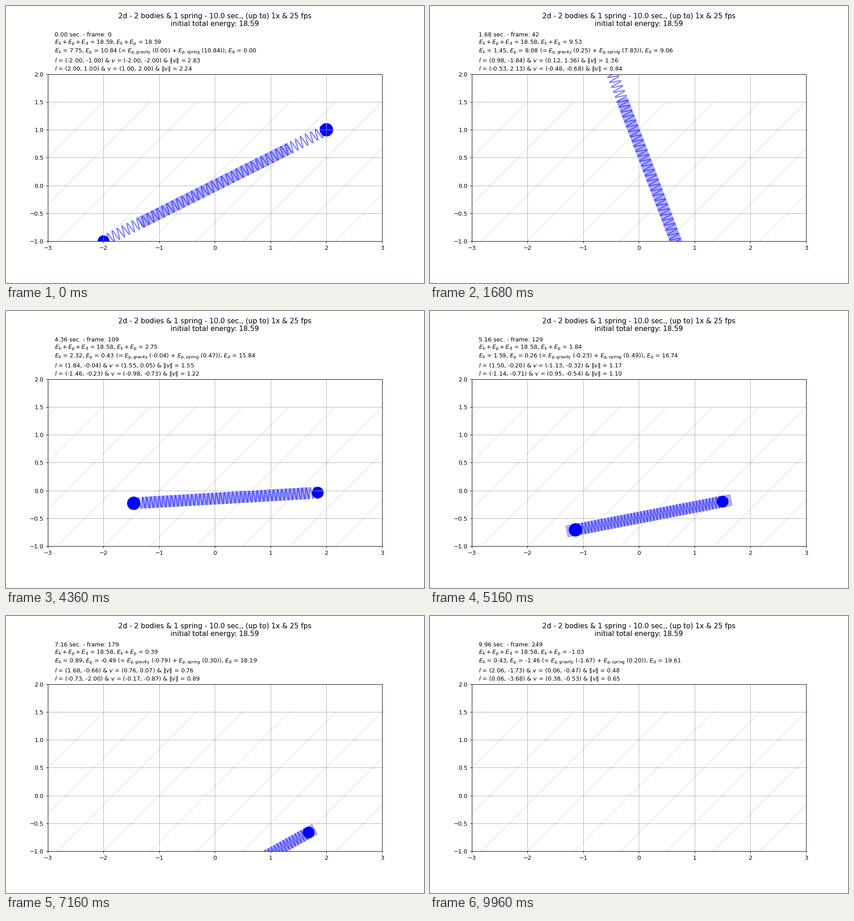
Recreate the animation shown at these times as a matplotlib script. Size 919x609 px, loop 10000 ms.

```python
import numpy as np
import matplotlib.pyplot as plt
from matplotlib.animation import FuncAnimation
from matplotlib.patches import Circle, Polygon

W, H, DPI = 919, 609, 92
FPS, SECONDS, SUBSTEPS = 25, 10, 50
DT = 1 / FPS / SUBSTEPS

# Points and vectors in the plane are complex numbers.
MASS = (1.0, 1.5)
GRAVITY = 0.1 - 0.2j
STIFFNESS, REST = 10.0, 3.0
DRAG, SURFACE = 0.5, 1.5
COILS, RADIUS = 45, 0.1


def drag(pos):
    """Drag acts only below the surface of the medium."""
    return DRAG if pos.imag < SURFACE else 0.0


def slope(state):
    p, q, v, w = state
    d = q - p
    pull = STIFFNESS * (1 - REST / abs(d)) * d
    a = GRAVITY + (pull - drag(p) * v) / MASS[0]
    b = GRAVITY + (-pull - drag(q) * w) / MASS[1]
    return v, w, a, b


def shift(state, rate, h):
    return tuple(s + h * r for s, r in zip(state, rate))


def rk4(state, h):
    k1 = slope(state)
    k2 = slope(shift(state, k1, h / 2))
    k3 = slope(shift(state, k2, h / 2))
    k4 = slope(shift(state, k3, h))
    return tuple(s + h / 6 * (a + 2 * b + 2 * c + d)
                 for s, a, b, c, d in zip(state, k1, k2, k3, k4))


def simulate():
    state, lost = (-2 - 1j, 2 + 1j, -2 - 2j, 1 + 2j), 0.0
    history = []
    for _ in range(FPS * SECONDS):
        history.append((state, lost))
        for _ in range(SUBSTEPS):
            state = rk4(state, DT)
            p, q, v, w = state
            lost += DT * (drag(p) * abs(v) ** 2 + drag(q) * abs(w) ** 2)
    return history


def energies(state):
    p, q, v, w = state
    kinetic = (MASS[0] * abs(v) ** 2 + MASS[1] * abs(w) ** 2) / 2
    height = sum(m * (GRAVITY.conjugate() * r).real for m, r in zip(MASS, (p, q)))
    spring = STIFFNESS * (abs(q - p) - REST) ** 2 / 2
    return kinetic, 0 - height, spring


def pair(z):
    return f"({z.real:.2f}, {z.imag:.2f})"


def sub(name):
    return rf"$E_\mathrm{{{name}}}$"


def body_line(pos, vel):
    return rf"$l$ = {pair(pos)} & $v$ = {pair(vel)} & $\|v\|$ = {abs(vel):.2f}"


def report(i, state, lost):
    p, q, v, w = state
    kin, grav, spring = energies(state)
    pot = grav + spring
    ek_ep = r"E_\mathrm{k} + E_\mathrm{p}"
    return "\n".join([
        f"{i / FPS:.2f} sec. - frame: {i}",
        rf"${ek_ep} + E_\mathrm{{d}}$ = {kin + pot + lost:.2f}, "
        rf"${ek_ep}$ = {kin + pot:.2f}",
        f"{sub('k')} = {kin:.2f}, {sub('p')} = {pot:.2f} "
        f"(= {sub('p,gravity')} ({grav:.2f}) + {sub('p,spring')} ({spring:.2f})), "
        f"{sub('d')} = {lost:.2f}",
        body_line(p, v),
        body_line(q, w),
    ])


def xy(z):
    return np.column_stack([np.real(z), np.imag(z)])


history = simulate()
total = sum(energies(history[0][0]))

# The small margin keeps the pixel size from rounding down.
fig = plt.figure(figsize=((W + 0.01) / DPI, (H + 0.01) / DPI), dpi=DPI)
fig.suptitle(f"2d - 2 bodies & 1 spring - {SECONDS:.1f} sec., (up to) 1x & {FPS} fps\n"
             f"initial total energy: {total:.2f}", y=0.976)
ax = fig.add_axes([91.8 / W, 91.77 / H, 735.2 / W, 367.6 / H])
ax.set(xlim=(-3, 3), ylim=(-1, 2),
       xticks=np.arange(-3, 4), yticks=np.arange(-1, 2.1, 0.5))
ax.grid(True)

# Slanted hatching marks the medium.
for j in range(-5, 5):
    c = 1 + j * 5 / 6
    ax.plot([-1 - c, SURFACE - c], [-1, SURFACE], color="k", alpha=0.15, lw=0.8)

sleeve = ax.add_patch(Polygon(np.zeros((4, 2)), color="b", alpha=0.3))
balls = [ax.add_patch(Circle((0, 0), RADIUS * m ** (1 / 3), color="b")) for m in MASS]
coil, = ax.plot([], [], color="b", alpha=0.5, lw=2)
info = ax.text(0.02, 1.01, "", transform=ax.transAxes, va="bottom")

along = np.linspace(0, 1, COILS * 20 + 1)
wave = RADIUS * np.sin(2 * np.pi * COILS * along)
corners = np.array([-1 - 1j, 1 - 1j, 1 + 1j, -1 + 1j])
box = corners.real * REST / 2 + 1j * corners.imag * RADIUS


def draw(i):
    state, lost = history[i]
    p, q = state[:2]
    unit = (q - p) / abs(q - p)
    for ball, pos in zip(balls, (p, q)):
        ball.center = pos.real, pos.imag
    sleeve.set_xy(xy((p + q) / 2 + unit * box))
    coil.set_data(*xy(p + (q - p) * along + 1j * unit * wave).T)
    info.set_text(report(i, state, lost))
    return [*balls, sleeve, coil, info]


anim = FuncAnimation(fig, draw, frames=len(history), interval=1000 / FPS,
                     repeat=True, repeat_delay=0)
plt.show()
```
